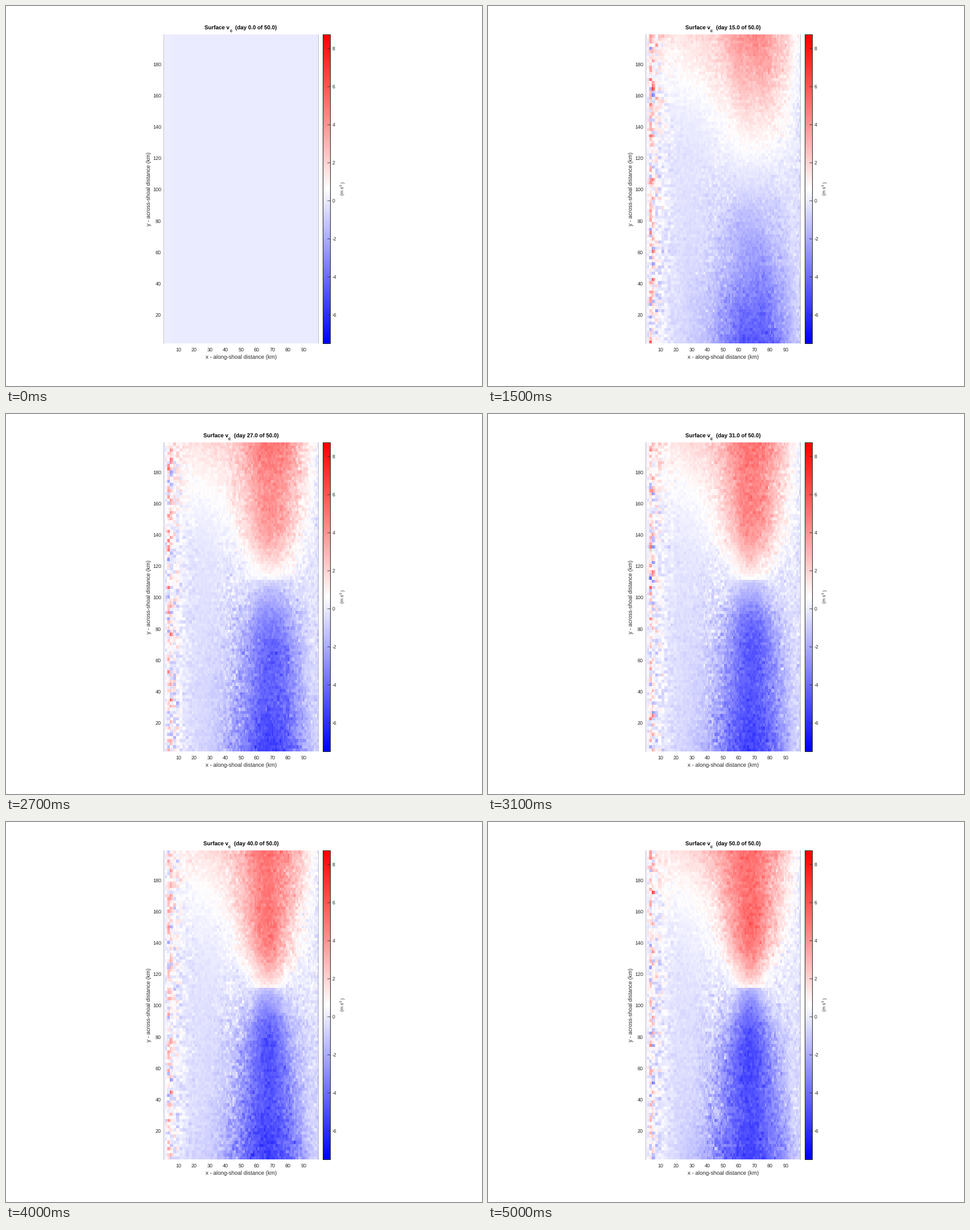
A matplotlib script that plays this animation: 837 px wide and 669 px high, repeating every 5.1 s.

```python
import numpy as np
import matplotlib.pyplot as plt
from matplotlib.animation import FuncAnimation
from matplotlib.colors import LinearSegmentedColormap
from matplotlib.patches import Rectangle

plt.rcParams["font.family"] = "Liberation Sans"
plt.rcParams["text.hinting"] = "no_hinting"

W, H, DPI = 837, 669, 72      # at 72 dpi a point is a pixel
LAST_DAY = 50
VMIN, VMAX = -7.49, 8.746
LEFT, RIGHT, TOP, BOTTOM = 277, 549.5, 50.5, 594.5
BAR_LEFT, BAR_RIGHT = 557.5, 570.5
INK = "#262626"
CMAP = LinearSegmentedColormap.from_list("flow", ["blue", "white", "red"], N=512)

# cell centres in km: 99 by 99 cells, 1 km wide and 2 km high
x = np.arange(1, 100)[None, :]
y = np.arange(2, 200, 2)[:, None]
north = (y - 111) / 89        # -1 .. 1 about the line where the flow parts
away = np.abs(north)


def bell(u, centre, width):
    return np.exp(-((u - centre) / width) ** 2)


def step(u, centre, width):
    return 1 / (1 + np.exp((centre - u) / width))


def mean_flow(day):
    """Two opposed jets that speed up, sharpen and narrow towards the parting line."""
    speed = 5 * (1 - np.exp(-day / 9))
    power = 0.2 + 2.6 * np.exp(-day / 12)
    bulge = 1 + 0.28 * bell(away, 0.38, 0.28) * step(day, 24, 3)
    axis = np.sign(north) * speed * away ** power * bulge

    centre = 70 - 3 * step(day, 30, 2.5)
    width = 4.5 + 24 * np.exp(-day / 17) + 11 * day / LAST_DAY * away
    core = bell(x, centre, 1.414 * width)
    broad = bell(x, 67, 28) * np.minimum(4 * away, 1)
    jet = axis * (0.8 * core + 0.2 * broad) * (1 - 0.6 * step(x, 94, 1.8))

    # weak drift west of the jets
    side = -0.25 + 1.7 * np.maximum(north, 0) ** 2 + 0.2 * np.minimum(north, 0)
    side = side * (0.2 + 0.8 * bell(x, 27, 20))
    return jet + side * min(day / 7, 1)


def patches(day):
    """Slowly drifting large blotches."""
    rng = np.random.default_rng(7)
    total = 0
    for _ in range(8):
        kx, ky = rng.normal(0, 0.22), rng.normal(0, 0.12)
        phase, drift = rng.uniform(0, 6.28), rng.normal(0, 0.35)
        total = total + np.sin(kx * x + ky * y + phase + drift * day)
    return total / 2


def speckle(day, flow):
    """Random eddies: weak inside the basin, strong along the western wall."""
    rng = np.random.default_rng(100 + day)
    fine = rng.normal(size=(99, 99))
    pairs = np.repeat(rng.normal(size=(99, 50)), 2, axis=1)[:, :99]
    grain = 0.75 * fine + 0.65 * pairs

    strength = np.abs(flow)
    late = np.clip((day - 5) / 20, 0, 1)
    eddies = 0.45 * bell(x, 47, 11) * (1 - 0.6 * step(y, 112, 6)) + 0.3 * bell(x, 85, 11)
    spread = (0.09 + 0.22 * np.minimum(strength / 4, 1)
              + late * eddies + 0.25 * np.exp((x - 99) / 3))
    blotch = 0.3 * patches(day) * np.minimum(strength / 2, 1) * (1 - 0.7 * late)
    edge = -0.4 * np.exp((x - 99) / 2)
    basin = spread * grain + blotch + edge

    wall_spread = 1.7 * bell(x, 4, 1.9) + 0.7 * bell(x, 8, 3.5) + 0.28 * bell(x, 14, 7)
    wall_mean = 1.2 * bell(x, 4, 1.8) + 0.45 * bell(x, 9, 6)
    wall = wall_mean + wall_spread * pairs
    return min(day / 6, 1) * basin + (1 - np.exp(-day)) * (1 - 0.004 * day) * wall


def field(day):
    flow = mean_flow(day)
    v = flow + speckle(day, flow) + 0.12 * np.exp(-x / 4)
    v[:, 0] = 0.1
    return v


fig = plt.figure(figsize=(W / DPI, H / DPI), dpi=DPI, facecolor="white")
ax = fig.add_axes([0, 0, 1, 1])
ax.axis("off")


def label(px, py, text, size, ha="center", **kw):
    kw.setdefault("color", INK)
    return ax.text(px, py, text, fontsize=size, ha=ha, va="baseline", **kw)


def picture(data, left, right):
    return ax.imshow(data, cmap=CMAP, vmin=VMIN, vmax=VMAX, origin="lower",
                     extent=(left, right, BOTTOM, TOP), aspect="auto",
                     interpolation="nearest")


# map and colour bar
sea = picture(field(0), LEFT, RIGHT)
picture(np.linspace(VMIN, VMAX, 545)[:, None], BAR_LEFT, BAR_RIGHT)
for px in (LEFT + 0.3, RIGHT):
    ax.plot([px, px], [TOP, BOTTOM], color="#b4b4be", lw=0.8, snap=False)
ax.add_patch(Rectangle((BAR_LEFT, TOP), BAR_RIGHT - BAR_LEFT, BOTTOM - TOP,
                       fill=False, ec=INK, lw=1, snap=False))
ax.set_xlim(0, W)
ax.set_ylim(H, 0)

# tick labels, set on baselines
for km in range(10, 100, 10):
    label(275.6 + 2.752 * km, 607.7, km, 9)
for km in range(20, 200, 20):
    label(272.9, 602 - 2.756 * km, km, 9, ha="right")
for v in range(-6, 9, 2):
    py = 343 - 33.5 * v
    ax.plot([BAR_RIGHT - 5, BAR_RIGHT], [py, py], color=INK, lw=0.8, snap=False)
    label(574, py + 3.1, v, 8.6, ha="left")

# axis titles
label(413.2, 620.8, "x - along-shoal distance (km)", 9.75)
upright = dict(rotation=90, rotation_mode="anchor")
label(253.5, 322, "y - across-shoal distance (km)", 9.75, **upright)
label(594.8, 333.2, "(m s", 7.9, ha="left", **upright)
label(591, 317.6, "-1", 6.2, ha="left", **upright)
label(594.8, 312, ")", 7.9, ha="left", **upright)

# heading in three parts because of the subscript
bold = dict(ha="left", weight="bold", color="black")
heading = [
    (0, label(0, 41.3, "Surface v", 9.75, **bold)),
    (43.9, label(0, 45.6, "c", 7.8, **bold)),
    (53.9, label(0, 41.3, "", 9.75, **bold)),
]


def update(day):
    sea.set_data(field(day))
    start = 349.4 if day < 10 else 346.7
    for offset, part in heading:
        part.set_x(start + offset)
    heading[2][1].set_text(f"(day {day:.1f} of {LAST_DAY:.1f})")
    return [sea] + [part for _, part in heading]


anim = FuncAnimation(fig, update, frames=LAST_DAY + 1, interval=100, repeat=True,
                     repeat_delay=0, blit=False)
plt.show()
```
